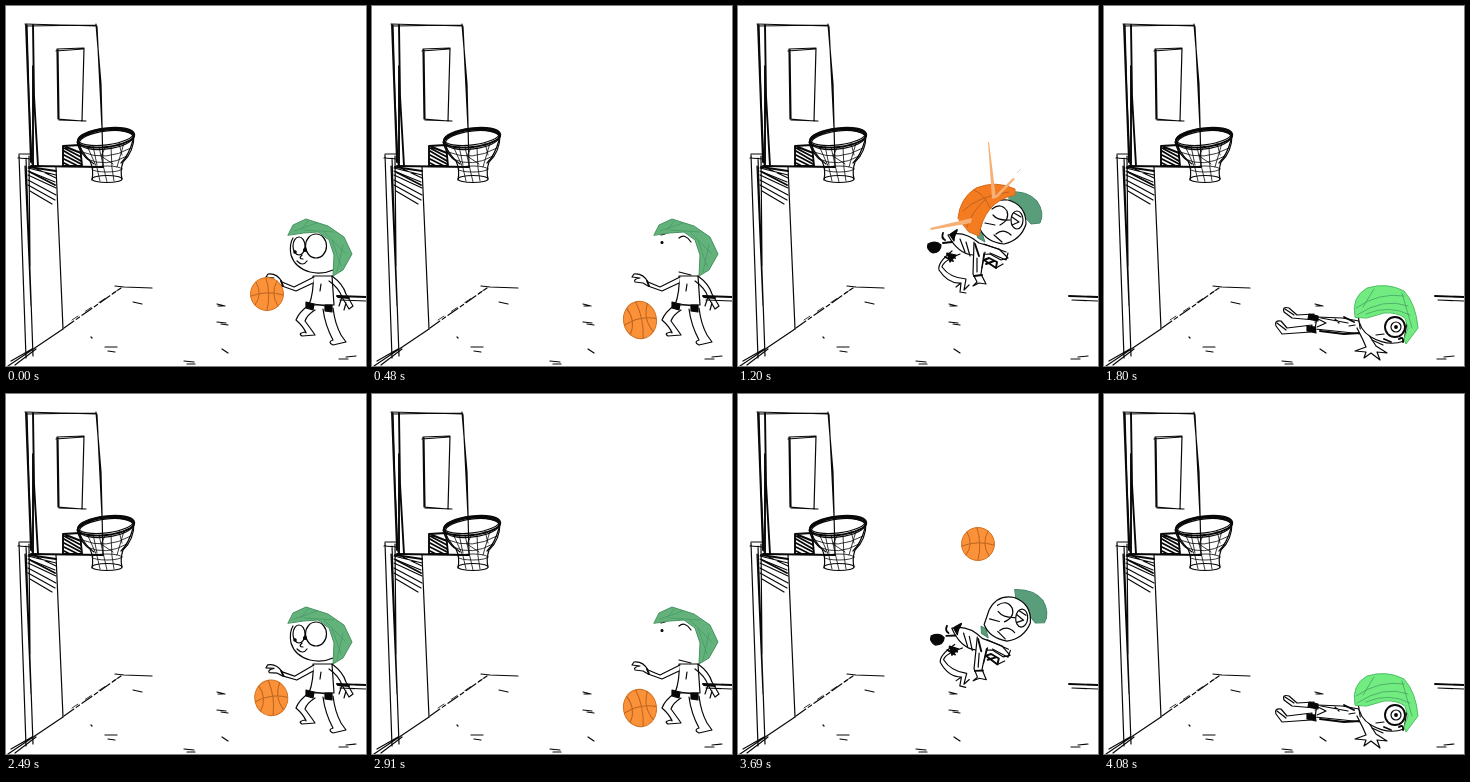
Write an HTML page that moves like this. It is 360 px wide and 360 px high and loops after 4800 ms.

```html
<!DOCTYPE html>
<html lang="en">
<head>
<meta charset="utf-8">
<title>Rebound</title>
<style>
html, body { margin: 0; width: 100%; height: 100%; overflow: hidden; background: #fff; }
svg { display: block; width: 100vw; height: 100vh; }
path, ellipse, circle { stroke: #080808; stroke-width: 1.2; stroke-linecap: round; stroke-linejoin: round; fill: none; }
.bold { stroke-width: 1.9; }
.thin { stroke-width: .8; }
.ink { fill: #080808; }
.skin { fill: #fff; }
.bare { fill: #fff; stroke: none; }
.dull { fill: #64b27b; stroke: #479361; stroke-width: 1; }
.bright { fill: #72ec80; stroke: #4fc065; stroke-width: 1; }
.grey { fill: #5a9d7b; stroke: #468668; stroke-width: 1; }
.strand { fill: none; stroke: #429962; stroke-width: .7; }
.ball { fill: #fb9138; stroke: #d67422; stroke-width: 1; }
.seam { stroke: #bd6420; stroke-width: 1; }
.hit { fill: #f47b20; stroke: #d96a18; stroke-width: 1; }
.ray { fill: #f6b075; stroke: none; }
</style>
</head>
<body>
<svg viewBox="0 0 360 360">
  <!-- court -->
  <g>
    <path d="M19 18L91 20M21 20L90 19M21 19L23 90L26 158M90 18L95 78L97 160M91 21L96 122"/>
    <path class="bold" d="M20 19L25 156M27 19L28 90L32 160M27 60L27 160M25 160L97 161"/>
    <path d="M51 43L78 42L76 115L52 113ZM50 45L77 43M52 44L53 114L80 115"/>
    <path class="bold" d="M57 140L74 139L76 160L57 160Z"/>
    <path class="bold" d="M58 142L75 151M58 145L75 155M58 149L75 158M58 153L72 160M60 141L75 147M58 157L64 160"/>
    <g transform="rotate(-7 100 132)">
      <ellipse class="bold" cx="100" cy="132" rx="28.500" ry="9"/>
      <ellipse cx="100" cy="130.500" rx="28" ry="8.500"/>
      <ellipse cx="100" cy="134" rx="27" ry="9"/>
      <path class="bold" d="M72 131Q85 122 104 124T128 132"/>
    </g>
    <path d="M71 136Q74 148 84 155Q88 163 86 174M128 129Q128 146 117 156Q114 165 116 173"/>
    <path d="M73 139Q80 153 88 158M127 134Q123 149 115 157"/>
    <ellipse cx="101" cy="163" rx="15" ry="3" class="thin"/>
    <ellipse cx="101" cy="173" rx="15" ry="3.500"/>
    <path class="thin" d="M82 142L91 162L94 175M93 141L98 163L101 176M105 141L106 162L108 175M118 137L111 161M76 146Q100 156 125 142M81 153Q100 162 121 150M87 140L91 159M100 140L95 150L107 158M113 137L116 149"/>
    <path d="M13 148L26 148M12 152L26 153M13 149L20 352M20 152L27 350M19 160L25 300M50 161L53 230L57 323M23 150L24 260"/>
    <path d="M22 162L50 169M22 165L49 176M22 169L50 182M22 174L50 189M22 179L49 194M24 185L46 198M31 163L50 172"/>
    <path class="bold" d="M23 161L50 165M24 166L49 179"/>
    <path d="M2 360L57 323M9 359L30 343M5 355L26 343"/>
    <path d="M58 322L115 282" stroke-dasharray="12 3 4 3"/>
    <path d="M66 314L112 284" class="thin" stroke-dasharray="7 9"/>
    <path d="M109 280L118 281L146 282M127 296L136 298M99 341L111 341M102 345L109 346M333 353L342 353M340 351L350 350M85 331L86 332"/>
    <path d="M211 298L219 300M212 300L217 300M211 316L220 317M215 318L222 319M216 343L222 347M178 355L188 356M181 358L189 358"/>
    <path class="bold" d="M331 290L360 291"/>
    <path d="M334 294L360 295"/>
  </g>

  <!-- dribbling -->
  <g id="dribble">
    <path class="bare" d="M287 230Q282 251 291 260Q304 270 326 267L328 240L310 227Z"/>
    <g id="face">
      <path d="M287 232Q283 238 285 249Q289 262 304 266Q316 269 327 264"/>
      <ellipse class="skin" cx="293" cy="240" rx="6" ry="9"/>
      <ellipse class="skin" cx="310" cy="240" rx="10.500" ry="12"/>
      <circle class="ink" cx="289" cy="246" r="1.200"/>
      <circle class="ink" cx="299" cy="244" r="1.500"/>
      <path d="M291 255Q297 261 301 255M296 249Q292 253 297 253"/>
    </g>
    <g id="lids">
      <circle class="ink" cx="290" cy="236.500" r="1"/>
      <path d="M307 232Q313 227 319 236M289 229L293 228M307 266L319 269"/>
    </g>
    <path class="dull" d="M282 229L287 219L300 213L322 220L338 231L346 248L337 264L327 270L328 249L323 234L312 226L298 227Z"/>
    <path class="strand" d="M288 225L311 217M298 224L328 226M318 226L339 247M326 234L335 260M302 215L295 224M337 239L331 266"/>
    <path class="skin" d="M307 270L326 270L328 299L303 299Q308 286 307 270Z"/>
    <path d="M326 270Q337 278 340 288L347 300M323 275Q333 282 336 291L343 303M336 291L333 300M340 297L338 304M347 300L343 303"/>
    <path class="bold" d="M332 291L343 292"/>
    <path d="M303 299Q293 306 290 314Q298 321 300 327M309 304Q301 309 299 315L307 326M300 326Q291 327 296 330L309 329L307 326M327 302Q329 318 335 329M317 303Q319 319 327 334M327 334Q321 336 327 339L340 336L335 329"/>
    <path class="ink" d="M300 296L308 298L307 304L300 302ZM319 299L326 299L326 306L319 305Z"/>
    <path d="M308 298L320 300M315 278L314 285"/>
    <g id="arm">
      <path class="skin" d="M308 271Q296 277 288 281L276 276Q271 267 262 268L260 271L268 272Q261 273 263 276L271 277L276 280L290 285L307 277"/>
      <path class="bold" d="M275 275L277 280"/>
    </g>
  </g>

  <!-- aiming and jumping -->
  <g id="aim">
    <path class="skin" d="M266 264L274 263Q283 272 281 283L278 293L264 291Q262 276 266 264Z"/>
    <path class="skin" d="M262 303Q269 311 265 316L257 326Q249 331 254 334L269 334L266 328L273 317L277 304Z"/>
    <path class="skin" d="M269 309L268 317L274 324Q280 330 280 324L273 314L277 304"/>
    <path d="M253 330L268 333M258 327L267 316"/>
    <path class="skin" d="M263 290L278 292L276 307L261 304Z"/>
    <path class="bold" d="M263 293L272 303M267 292L276 302M263 299L269 304M264 297L276 296M271 294L276 298"/>
    <path class="skin" d="M250 219Q243 226 243 238Q243 250 252 257Q263 264 286 264L288 238L276 218Z"/>
    <ellipse class="skin" cx="256" cy="231" rx="6" ry="9"/>
    <circle class="skin" cx="273" cy="235" r="10.500"/>
    <circle class="ink" cx="253" cy="230" r="1.600"/>
    <circle class="ink" cx="266" cy="236" r="1.800"/>
    <path d="M254 249Q262 252 265 246M254 239Q249 242 256 243M262 246L266 249"/>
    <path class="bright" d="M248 218L257 208Q268 203 285 208L300 217L309 241L303 253L291 267L288 260L289 241L284 228L277 222Z"/>
    <path class="strand" d="M254 214L283 209M268 218L298 220M281 222L305 241M289 235L296 257M263 207L258 217"/>
  </g>

  <g id="ball">
    <circle class="ball" r="16.500"/>
    <path class="seam" d="M-16 2Q0 -4 16 1M-1 -16Q4 0 0 16M-11 -12Q-4 0 -12 11M10 -13Q3 0 11 12"/>
  </g>

  <path id="grip" class="skin" d="M276 265L262 263L252 264L250 267L258 268L252 270L260 272L265 277L278 277"/>
  <path id="reach" class="skin" d="M269 267L255 251L249 233L244 230L246 237L242 236L249 251L264 275M276 266L266 247L260 230"/>

  <!-- struck in the air -->
  <g id="struck">
    <path class="skin" d="M210 229Q226 224 241 237L261 243L270 252L263 254L252 248L235 249Q220 248 210 229Z"/>
    <path class="bold" d="M207 234Q203 232 205 227M213 228L219 224L216 231M205 237L214 236M207 251L215 255M209 248L217 252"/>
    <path class="ink" d="M190 238Q198 234 203 239Q203 246 195 247Q188 244 190 238ZM212 229L217 226L216 235ZM209 247L218 249L212 256Z"/>
    <path d="M222 248Q205 255 204 261Q212 272 228 273L226 284L231 279M214 245Q199 257 201 264Q210 278 223 277L222 286L228 287M223 277L218 281"/>
    <path class="skin" d="M236 236L235 268L239 276L235 280L241 277L248 278L243 268L246 247"/>
    <path class="bold" d="M236 270L244 269M246 254L258 262L259 256L251 252ZM248 258L256 255M237 238L241 250"/>
    <path d="M252 247L268 254L270 247M246 238L268 246M228 236L232 250M222 233L227 246M247 246L244 262M258 262L265 258M239 252L239 266"/>
    <path class="grey" d="M270 186Q289 184 299 195Q307 207 302 217L293 218L283 207L272 196ZM239 225L244 227L247 236L240 232Z"/>
    <path class="skin" d="M246 208Q253 192 270 194Q288 199 288 218Q283 234 266 238Q248 236 242 223Z"/>
    <ellipse class="skin" cx="279" cy="214" rx="6" ry="9"/>
    <path d="M254 203Q263 196 269 205Q272 214 262 219M255 209Q260 215 272 214M258 228Q265 222 273 229M274 211L281 216L274 219M247 217L257 219M256 229L264 236M276 207L283 211"/>
  </g>
  <g id="impact">
    <path class="hit" d="M220 212Q222 192 238 182Q258 174 277 183L277 189Q261 192 252 203Q243 214 241 230L231 226Z"/>
    <path class="seam" d="M225 205Q240 190 271 186M236 184Q247 189 252 202M229 221Q234 205 248 193"/>
    <path class="ray" d="M192 222L234 212L233 217L193 224ZM250 136L251 136L258 192L254 193ZM275 172L277 173L259 192L257 190Z"/>
    <path class="thin" style="stroke:#d5d0ca" d="M283 163L279 167"/>
  </g>

  <!-- flat on the floor -->
  <g id="flat">
    <path class="skin" d="M213 311L238 312L255 315L257 328L240 326L211 323Z"/>
    <path class="skin" d="M210 308L193 309L185 302Q178 300 180 306L188 312L211 314ZM208 319L183 322L177 315Q170 314 172 320L178 328L207 326Z"/>
    <path class="ink" d="M205 308L214 310L214 315L204 313ZM203 320L211 321L212 327L203 325Z"/>
    <path d="M214 313L222 317L213 321M231 313L235 317M245 320L251 319M217 312L244 317M181 303L190 309M173 317L182 324"/>
    <path class="bold" d="M216 325L240 328L256 327M240 311L250 316"/>
    <path class="skin" d="M253 322L259 334L262 341L251 345L262 346L260 352L267 347L276 354L273 346L283 347L272 340L263 326"/>
    <path class="skin" d="M254 309Q255 324 267 331Q284 341 300 335L304 310L278 301Z"/>
    <circle class="skin bold" cx="291" cy="321" r="10"/>
    <circle cx="292" cy="321" r="5"/>
    <circle class="ink" cx="292" cy="321" r="1.300"/>
    <path class="bold" d="M280 333L287 336M295 333Q300 330 299 336"/>
    <path d="M272 329L280 328M268 334L279 339"/>
    <path class="bright" d="M251 311Q247 291 263 282Q283 276 300 285Q312 298 314 322L302 338L300 333L304 322L301 312Q293 306 280 307L263 312Z"/>
    <path class="strand" d="M252 302Q275 286 300 290M253 309Q280 291 304 300M262 308Q285 298 306 309M270 283L259 301M298 287L308 322"/>
  </g>
</svg>
<script>
const part = {};
for (const node of document.querySelectorAll("[id]")) part[node.id] = node;

const show = (name, on) => part[name].style.display = on ? "" : "none";

// Linear interpolation through [time, ...values] keys.
function track(t, keys) {
  const i = keys.findIndex(k => k[0] > t);
  if (i === 0) return keys[0].slice(1);
  if (i < 0) return keys[keys.length - 1].slice(1);
  const a = keys[i - 1], b = keys[i], u = (t - a[0]) / (b[0] - a[0]);
  return a.slice(1).map((v, n) => v + (b[n + 1] - v) * u);
}

// Move, turn and scale a part around its pivot.
function place(name, px, py, [x, y, turn = 0, sx = 1, sy = 1]) {
  part[name].setAttribute("transform",
    `translate(${px + x} ${py + y}) rotate(${turn}) scale(${sx} ${sy}) translate(${-px} ${-py})`);
}

const AIM = [[600, 32, 2, 3, 1], [720, 8, 0, 0, 1], [780, 0, 0, 0, 1], [960, 0, 0, 0, 1],
  [1020, -2, 0, -3, .92], [1080, -8, -40, -8, 1], [1140, -12, -55, -4, 1], [1170, -10, -45, 0, 1]];
const THROW = [[1020, 245, 260, 0, 1.18], [1080, 232, 180, -40, 1.1], [1110, 165, 112, -100, 1],
  [1140, 104, 88, -170, .95], [1170, 168, 130, -60, 1.05], [1200, 235, 200, 0, 1.1]];
const BOUNCE = [[1260, 240, 150, 0, 1], [1380, 300, 55, 160, 1], [1500, 378, 10, 320, 1]];
const STRUCK = [[1200, 0, 0, 0], [1260, 4, 8, 4], [1350, 10, 58, 24]];
const FLAT = [[1350, 0, -10, 4, 1], [1380, 0, 0, 0, .92], [1440, 0, -8, -2, 1], [1500, 0, 0, 0, .97], [1560, 0, 0, 0, 1]];

function dribbleBall(t) {
  const height = Math.abs(1 - (t % 320) / 160);
  const fall = 1 - height * height;
  return [261 + 7 * fall, 288 + 26 * fall, -10 * fall, 1, 1 + .13 * fall];
}

function ballPose(t) {
  if (t < 600) return dribbleBall(t);
  if (t < 1020) {
    const [x, y, turn] = track(t, AIM);
    return [247 + x, 267 + y, turn - 18, 1.18, 1.18];
  }
  const [x, y, turn, size] = track(t, t < 1200 ? THROW : BOUNCE);
  return [x, y, turn, size, size];
}

function draw(now) {
  const loop = now % 4800;
  const raw = loop < 2430 ? loop : loop - 2430;
  const step = raw < 1080 || (raw >= 1200 && raw < 1260) ? 60 : 30;
  const t = Math.floor(raw / step + 1e-6) * step;

  const aiming = t >= 600 && t < 1200;
  const blink = t >= 420;
  show("dribble", t < 600);
  show("face", !blink);
  show("lids", blink);
  show("aim", aiming);
  show("grip", aiming && t < 1080);
  show("reach", aiming && t >= 1080);
  show("ball", t < 1200 || (t >= 1260 && t < 1500));
  show("struck", t >= 1200 && t < 1350);
  show("impact", t === 1200);
  show("flat", t >= 1350);

  place("arm", 307, 273, [0, 0, -5 * Math.sin(t * Math.PI / 240)]);
  const [bx, by, lean, stretch] = track(t, AIM);
  for (const name of ["aim", "grip", "reach"]) place(name, 268, 334, [bx, by, lean, 1, stretch]);
  place("ball", 0, 0, ballPose(t));
  place("struck", 250, 225, track(t, STRUCK));
  const [x, y, turn, sy] = track(t, FLAT);
  place("flat", 245, 350, [x, y, turn, 1, sy]);
}

const start = performance.now();
function tick() {
  draw(performance.now() - start);
  requestAnimationFrame(tick);
}
tick();
</script>
</body>
</html>
```
